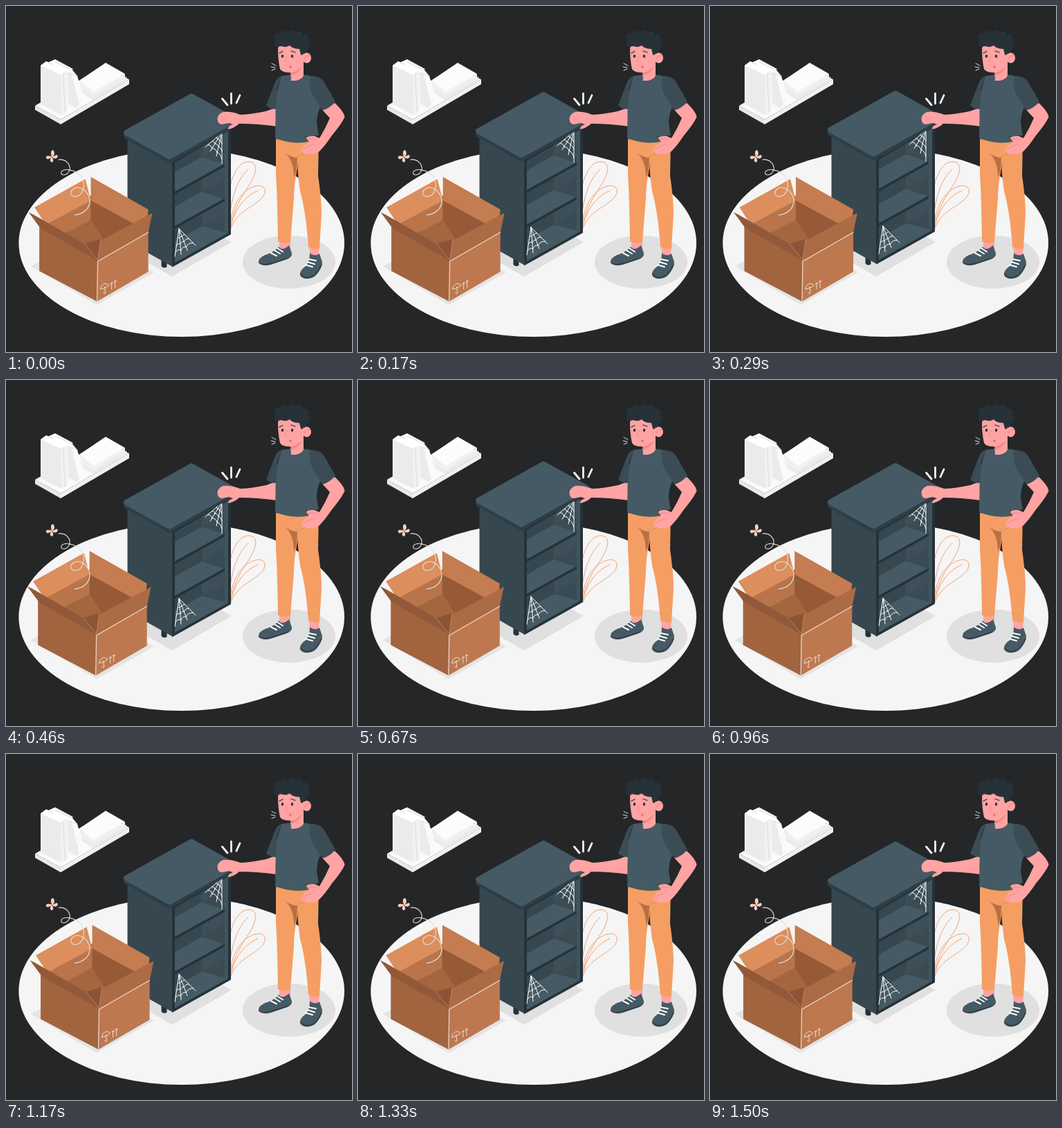
Recreate the animation shown at these times as an HTML page. Size 500 by 500 pixels, loop 1.54 s.

```html
<!DOCTYPE html>
<html lang="en">
<head>
<meta charset="utf-8">
<title>Empty shelf</title>
<style>
  html, body { margin: 0; width: 100%; height: 100%; overflow: hidden; background: #242628; }
  svg { display: block; width: 100vw; height: 100vh; }
  .line { fill: none; stroke: #fff; stroke-linecap: round; stroke-linejoin: round; }
</style>
</head>
<body>
<svg viewBox="0 0 500 500">
  <ellipse cx="253.700" cy="342.500" rx="235.300" ry="135.500" fill="#f5f5f5"/>

  <!-- books on the wall -->
  <g>
    <path d="M42 144L140 88L178 106L79 164Z" fill="#fafafa"/>
    <path d="M42 144L79 164V171L42 150Z" fill="#e8e8e8"/>
    <path d="M79 164L178 106V113L79 171Z" fill="#f0f0f0"/>
    <path d="M107 118L126 130L174 102V107L126 136L107 124Z" fill="#ebebeb"/>
    <path d="M107 107L126 124L172 98V103L126 130L107 118Z" fill="#f0f0f0"/>
    <path d="M107 107L144 82L172 98L126 124Z" fill="#fcfcfc"/>
    <path d="M67 82L71 78L94 90L103 101L115 141L101 147L88 140Z" fill="#fafafa"/>
    <path d="M89 95L95 99L106 144L101 147L90 141Z" fill="#ebebeb"/>
    <path d="M50 86L58 80L70 86L76 81L89 89V152L80 157L50 142Z" fill="#f2f2f2"/>
    <path d="M50 86L79 99L80 157L50 142Z" fill="#ebebeb"/>
    <path d="M50 86L58 80L87 93L79 99ZM60 82L71 77L97 91L91 96Z" fill="#fff"/>
    <path d="M61 84L66 82L67 86M71 81L94 92M91 97L103 101M83 98L85 154" class="line" style="stroke:#d9d9d9"/>
  </g>

  <!-- shadows -->
  <g fill="#e0e0e0">
    <path d="M186 360L240 391L326 341L272 311Z"/>
    <path d="M36 376L131 432L214 385L120 330Z" fill="#e4e4e4"/>
    <ellipse cx="409" cy="370" rx="67" ry="38.500"/>
  </g>

  <!-- plant -->
  <g class="line" style="stroke:#f3a272">
    <path d="M322 304C318 262 330 232 345 226C357 222 363 230 360 240C355 262 332 276 325 318"/>
    <path d="M324 298C328 268 338 246 350 236"/>
    <path d="M324 318C326 286 342 264 362 260C375 258 377 268 371 276C358 291 334 296 325 321"/>
    <path d="M326 314C332 292 346 274 364 267"/>
  </g>

  <g id="cabinet">
    <path d="M224.500 364H232.500V377Q228 380 224.500 376Z" fill="#263238"/>
    <path d="M175.500 188L241 225V377L175.500 340Z" fill="#37474f"/>
    <path d="M240 222L325 172V330L240 377.500Z" fill="#263238"/>
    <path d="M244 226L321 181V328L244 371Z" fill="#37474f"/>
    <!-- inner right wall -->
    <path d="M283 203L321 181V328L283 318Z" fill="#3d4f58"/>
    <!-- shelves -->
    <g fill="#455a64">
      <path d="M244 240L283 218L316 229L244 269Z"/>
      <path d="M244 290L283 268L316 279L244 319Z"/>
      <path d="M244 340L283 318L321 328L244 371Z"/>
    </g>
    <path d="M283 218L316 199V229ZM283 268L316 249V279ZM283 318L316 299L321 328Z" fill="#3a4b54"/>
    <path d="M244 268L316 228V232L244 272ZM244 318L316 278V282L244 322Z" fill="#263238"/>
    <path d="M316 184L321 181V328L316 326Z" fill="#40545d"/>
    <g id="webs" class="line" style="stroke-width:1"></g>
    <!-- top -->
    <g stroke-width="8" stroke-linejoin="round">
      <path d="M174 188L236 223L330 170L268 135Z" fill="#2f3e46" stroke="#2f3e46"/>
      <path d="M174 183L236 217.500L330 165L268 130.500Z" fill="#455a64" stroke="#455a64"/>
    </g>
  </g>

  <g id="box">
    <!-- inside -->
    <path d="M49 318L123 274L206 320L132 364Z" fill="#a9693f"/>
    <path d="M49 318L123 274V311L74 334Z" fill="#b9744a"/>
    <path d="M123 274L200 316L140 340L123 311Z" fill="#965a38"/>
    <path d="M123 309L76 334L116 346L142 338Z" fill="#a4663e"/>
    <!-- back flaps -->
    <path d="M41.500 291L115 250L123 281L58 316Z" fill="#dc8e5c"/>
    <path d="M123 247L206 294L205 304L189 317L123 281Z" fill="#c47c50"/>
    <!-- outer faces -->
    <path d="M48.500 316L133 364L132 427L48.500 383Z" fill="#a1643f"/>
    <path d="M132 367L206 324V384L132 427Z" fill="#bd7850"/>
    <!-- front flaps -->
    <path d="M113 344L137 337L133 368Z" fill="#8c5436"/>
    <path d="M33 298L41 302L114 344L133 368L50 321Z" fill="#915939"/>
    <path d="M212 299L137 339L133 368L206 327Z" fill="#ab6b45"/>
    <path d="M114 344L133 367L137 338" class="line" style="stroke:#c98a60;stroke-width:.8"/>
    <path d="M206 327L133 369L132 426" class="line" style="stroke:#ecd9cc;stroke-width:1.200"/>
    <!-- handling marks -->
    <path d="M137 409C137 402 146 398 149 404Q146 405 145 407Q142 405 141 409Q139 408 137 409ZM143 406L144 415Q142 417 141 414M153 409V400L151 402M153 400L155 401M158 407V397L156 399M158 397L160 398" class="line" style="stroke:#f1dfd3;stroke-width:1"/>
  </g>

  <!-- butterfly -->
  <path d="M76 222C88 221 95 231 91 239C87 246 78 245 80 240C83 234 101 236 109 247C116 258 111 273 103 275C94 277 91 269 97 264.500C106 258 119 267 121 280C122 293 111 301 99 302" class="line" style="stroke-width:1.100;stroke:#e0e0e0"/>
  <g fill="#f8d0bd">
    <path d="M66 217Q63 209 68 208Q72 212 68 218Q74 213 75 217Q73 223 67 219Q70 225 66 226Q62 224 65 219Q60 223 58 220Q57 215 64 217Z"/>
    <path d="M64 214L68 221" class="line" style="stroke:#8a5f4d;stroke-width:1"/>
  </g>

  <!-- person -->
  <g>
    <path d="M312.500 134L320 143M325.500 126.500V141M338 129L333 140" class="line" style="stroke-width:2.800;stroke:#f5f5f5"/>
    <path d="M384 83L390 86M383 88L389 89M384 93L389 91" class="line" style="stroke-width:1;stroke:#ddd"/>

    <!-- shoes -->
    <g fill="#ffa3a3">
      <path d="M395 338H411V351Q404 357 395 350Z"/>
      <path d="M438 346H453L452 361Q444 365 439 359Z"/>
    </g>
    <g fill="#455a64">
      <path d="M394 348Q399 355 409 346L413 357Q414 363 406 366L382 374Q368 377 365 370Q365 364 374 360Q387 356 394 348Z"/>
      <path d="M439 357Q445 363 453 358L457 370Q457 378 449 388Q443 395 432 394Q424 392 425 386Q426 381 433 376Q439 369 439 357Z"/>
    </g>
    <g class="line">
      <path d="M365.500 371Q372 376 387 371L408 364M425.500 388Q434 395 444 390Q451 385 456 374" style="stroke:#2f3d45;stroke-width:1.500"/>
      <path d="M383 357L391 361M388 353L396 358M392 350L400 355M433 374L443 377M436 370L446 373M438 366L448 368" style="stroke-width:2"/>
    </g>

    <!-- trousers -->
    <path d="M390 192L424 196L421 235Q416 258 416 278L411 341Q402 344 393 340Q392 270 390 245Z" fill="#f59e63"/>
    <path d="M414 192L452 191L451 245Q456 280 456 300L453 350Q445 352 437 348Q433 295 425 268Q421 240 421 216Z" fill="#f59e63"/>
    <path d="M404 213Q413 219 421 219L420 238L416 248Q416 224 404 213Z" fill="#b87143"/>
    <path d="M421 217Q432 216 437 207" class="line" style="stroke:#d9854d;stroke-width:.8"/>

    <!-- arms -->
    <path d="M392 146L376 152Q352 157 338 157Q326 152 314 153Q306 156 305.500 163Q306 171 312 171L322 169L328 171Q320 174 321 178Q329 177 337 170Q362 170 392 174Z" fill="#ffa3a3"/>
    <path d="M457 150L475 140Q488 152 489.500 160Q486 169 471 187Q461 202 452 211Q443 217 430 213Q424 207 431 201L438 197L433 191Q438 186 446 188L453 191Q461 178 468 162Z" fill="#ffa3a3"/>
    <path d="M429 207Q437 202 444 200M433 192Q443 192 450 193" class="line" style="stroke:#f08080;stroke-width:.8"/>

    <!-- shirt -->
    <path d="M398 101Q424 97 440 101Q457 101 458 120L457 140Q449 154 449 170L452 187L432 189L438 196Q414 201 389 191L390 130Z" fill="#455a64"/>
    <path d="M398 101Q391 103 387 115L376 144Q382 149 390 149L392 118Z" fill="#3b4c55"/>
    <path d="M440 101Q456 101 461 112L476 138Q468 148 457 151L443 129Q436 111 440 101Z" fill="#3b4c55"/>

    <!-- head -->
    <path d="M411 88L430 78L430 101Q425 109 412 108Z" fill="#ffa3a3"/>
    <path d="M412 95Q421 94 428 87Q424 98 411 101Z" fill="#f58788"/>
    <path d="M393 62Q393 55 405 53H424Q431 62 430 78Q425 94 413 96Q399 97 396 91Q393 78 393 62Z" fill="#ffa3a3"/>
    <ellipse cx="434.500" cy="75" rx="6.500" ry="7.500" fill="#ffa3a3"/>
    <path d="M431 77Q433 71 438 72" class="line" style="stroke:#f07b7f;stroke-width:1"/>
    <g id="hair" fill="#263238">
      <path d="M391 56Q391 43 412 40Q433 40 437 57Q437 65 430 68Q428 73 426 70L424 62Q414 62 410 57Q402 61 391 56Z"/>
    </g>
    <g fill="#263238">
      <ellipse cx="399.500" cy="72.500" rx="1.700" ry="2.200"/>
      <ellipse cx="413.500" cy="72.500" rx="1.700" ry="2.200"/>
    </g>
    <path d="M395 68L400 65.500M412 65L418 67" class="line" style="stroke:#263238;stroke-width:1.300"/>
    <path d="M406 73L403 80L407 81" class="line" style="stroke:#f58788;stroke-width:1"/>
    <ellipse cx="411" cy="88" rx="2.200" ry="1.800" fill="#e5767b"/>
  </g>
</svg>

<script>
const $ = id => document.getElementById(id);
const NS = 'http://www.w3.org/2000/svg';

function add(parent, tag, attrs) {
  const el = document.createElementNS(NS, tag);
  for (const k in attrs) el.setAttribute(k, attrs[k]);
  parent.append(el);
}

// Spokes from one corner, joined by sagging threads.
function web(x, y, tips) {
  const at = ([a, b], k) => [x + (a - x) * k, y + (b - y) * k];
  let d = tips.map(tip => `M${x} ${y}L${tip}`).join('');
  for (const k of [.35, .6, .85]) {
    for (let i = 1; i < tips.length; i++) {
      const p = at(tips[i - 1], k), q = at(tips[i], k);
      const mid = at([(p[0] + q[0]) / 2, (p[1] + q[1]) / 2], .85);
      d += `M${p}Q${mid} ${q}`;
    }
  }
  add($('webs'), 'path', { d });
}
web(312, 183, [[288, 204], [295, 210], [304, 217], [312, 228]]);
web(250, 322, [[244, 362], [253, 359], [262, 353], [274, 346]]);

for (const [cx, cy, r] of [[393, 53, 6], [394, 45, 6], [403, 42, 6.5], [413, 41, 6],
  [423, 43, 6.5], [432, 47, 6], [435, 56, 5.5], [404, 52, 7], [417, 53, 7], [428, 57, 6]])
  add($('hair'), 'circle', { cx, cy, r });

const LOOP = 1540, PERIOD = 1500, STEP = 1000 / 24, LEAD = 27;
const SHAKE = [0, -1, 2, -4, 4, -4, 4, -4, 2, -1, 0];

function shake(p) {
  const i = Math.floor(p * 10), k = p * 10 - i;
  return SHAKE[i] + (SHAKE[i + 1] - SHAKE[i]) * k;
}
const lift = p => -10 * (1 - Math.abs(1 - 2 * p));

const start = performance.now();
function draw() {
  const t = (performance.now() - start) % LOOP;
  const held = Math.floor((t + 4) / STEP) * STEP;
  const p = (held + LEAD) / PERIOD % 1;
  $('cabinet').setAttribute('transform', `translate(0 ${lift(p) + .36})`);
  $('box').setAttribute('transform', `translate(${shake(p) - .2} 0)`);
  requestAnimationFrame(draw);
}
draw();
</script>
</body>
</html>
```
